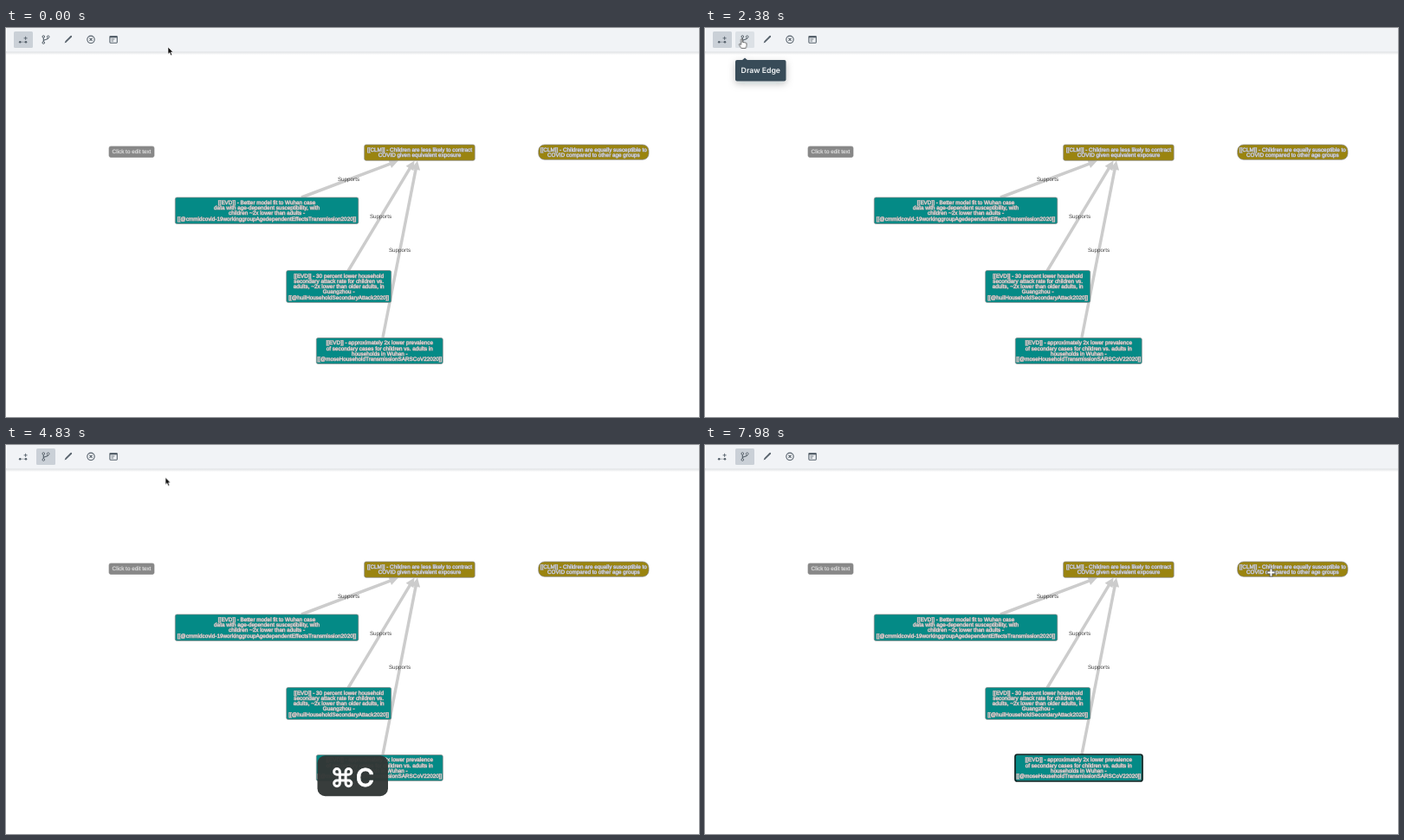
An HTML page that plays this animation: 800x450 px, repeating every 8000 ms.

```html
<!DOCTYPE html>
<html lang="en">
<head>
<meta charset="utf-8">
<title>Discourse graph: draw edge</title>
<style>
html, body { margin: 0; width: 100%; height: 100%; overflow: hidden; background: #fff; }
svg { display: block; width: 800px; height: 450px; text-rendering: geometricPrecision; }

.node text { font: 6.35px "Liberation Sans", Arial, sans-serif; fill: #ececec; stroke: #999; stroke-width: .9px; paint-order: stroke; text-anchor: middle; }
.node rect { stroke: #888; stroke-width: .7; }
.edge { stroke: #ccc; stroke-width: 3.5; }
.label { font: 6.3px "Liberation Sans", Arial, sans-serif; fill: #444; text-anchor: middle; }
.icons { fill: none; stroke: #56616b; stroke-width: 1.1; }
.icons .solid { fill: #56616b; stroke: none; }
.keys text { font: 600 7.5px Inter, sans-serif; fill: #4a545e; text-anchor: middle; }
.tip text { font: 600 8.7px Inter, sans-serif; fill: #f5f8fa; text-anchor: middle; }
.cmd { fill: none; stroke: #fff; stroke-width: 2.7; }
.big { font: 600 29px Inter, sans-serif; fill: #fff; stroke: #fff; stroke-width: .5px; text-anchor: middle; }
.plate { fill: #323736; fill-opacity: .97; }

/* one shared 8 s timeline; 1% is 80 ms */
.run { animation: 8s step-end infinite; }
.smooth { animation-timing-function: linear; }
#cursor { animation-name: travel; animation-timing-function: ease-in-out; }
#arrow { animation-name: arrow; }
#hand { animation-name: hand; }
#cell { animation-name: cell; }
#nodeMode { animation-name: nodeMode; }
#hover { animation-name: hover; }
#edgeMode { animation-name: edgeMode; }
#tip { animation-name: tip; }
#keys { animation-name: keys; }
#cmd { animation-name: cmd; }
#cmdC { animation-name: cmdC; }
#halo { animation-name: halo; }
#picked { animation-name: picked; }
#ring { animation-name: ring; transform-origin: 500px 370px; }

@keyframes travel {
  0% { transform: translate(187px, 22px); }
  13.125% { transform: translate(66px, 39px); }
  20%, 50% { transform: translate(42.5px, 13px); }
  60.375% { transform: translate(184px, 37.5px); }
  64% { transform: translate(188px, 42px); }
  81%, 90.4% { transform: translate(500px, 369.5px); }
  99.4%, 100% { transform: translate(653.5px, 147.5px); }
}
@keyframes arrow {
  0% { opacity: 1; } 17.2% { opacity: 0; } 53% { opacity: 1; }
  79% { opacity: 0; } 92% { opacity: 1; } 97.6%, 100% { opacity: 0; }
}
@keyframes hand { 0% { opacity: 0; } 17.2% { opacity: 1; } 53%, 100% { opacity: 0; } }
@keyframes cell {
  0% { opacity: 0; } 79% { opacity: 1; } 92% { opacity: 0; } 97.6%, 100% { opacity: 1; }
}
@keyframes nodeMode { 0% { opacity: 1; } 49%, 100% { opacity: 0; } }
@keyframes hover { 0% { opacity: 0; } 17.2% { opacity: 1; } 49%, 100% { opacity: 0; } }
@keyframes edgeMode { 0% { opacity: 0; } 49%, 100% { opacity: 1; } }
@keyframes tip { 0%, 18.3% { opacity: 0; } 19.6%, 53% { opacity: 1; } 54.2%, 100% { opacity: 0; } }
@keyframes keys { 0% { opacity: 0; } 32.4% { opacity: 1; } 58.6%, 100% { opacity: 0; } }
@keyframes cmd { 0% { opacity: 0; } 32.4% { opacity: 1; } 49%, 100% { opacity: 0; } }
@keyframes cmdC { 0%, 48.9% { opacity: 0; } 49%, 63.5% { opacity: 1; } 66%, 100% { opacity: 0; } }
@keyframes halo { 0% { opacity: 0; } 85.6% { opacity: 1; } 89.8%, 100% { opacity: 0; } }
@keyframes picked { 0% { opacity: 0; } 89.8%, 100% { opacity: 1; } }
@keyframes ring {
  0%, 85.5% { opacity: 0; transform: scale(.6); }
  86.5%, 89.8% { opacity: 1; transform: none; }
  91%, 100% { opacity: 0; transform: none; }
}
</style>
</head>
<body>
<svg viewBox="0 0 800 450">
  <defs>
    <filter id="soft" x="-30%" y="-80%" width="160%" height="300%">
      <feDropShadow dx="0" dy="3" stdDeviation="4" flood-color="#10161a" flood-opacity=".25"/>
    </filter>
    <linearGradient id="fade" x2="0" y2="1">
      <stop stop-color="#d9dcdf"/><stop offset="1" stop-color="#fff"/>
    </linearGradient>
    <path id="loop" d="M18 3a3 3 0 0 0-3 3v12a3 3 0 1 0 3-3H6a3 3 0 1 0 3 3V6a3 3 0 1 0-3 3h12a3 3 0 0 0 0-6z"/>
  </defs>

  <rect y="27" width="800" height="4" fill="url(#fade)"/>
  <rect x="1" width="799" height="27.5" fill="#f1f3f6"/>

  <rect id="nodeMode" class="run" x="9" y="4" width="22" height="19" rx="1.5" fill="#cad0d7"/>
  <rect id="hover" class="run" x="35" y="4" width="22" height="19" rx="1.5" fill="#dce1e6"/>
  <rect id="edgeMode" class="run" x="35" y="4" width="22" height="19" rx="1.5" fill="#cad0d7"/>

  <g class="icons">
    <path d="M17 16.2h5" stroke-dasharray="1.2 .8" stroke-width=".7"/>
    <path d="M20.6 11.8h4M22.6 9.8v4" stroke-width=".9"/>
    <g class="solid">
      <circle cx="16.2" cy="16.2" r="1.3"/><circle cx="23" cy="16.2" r="1.3"/>
    </g>
    <path d="M43.3 11v5M43.3 15c0-2 5.4-.8 5.4-4"/>
    <g fill="#f1f3f6" stroke-width="1">
      <circle cx="43.3" cy="10" r="1.3"/><circle cx="48.7" cy="10.2" r="1.3"/><circle cx="43.3" cy="17" r="1.3"/>
    </g>
    <path class="solid" d="M67.6 17.6l1-2.6 5.9-5.9q.7-.6 1.3 0t0 1.3l-5.9 5.9z"/>
    <circle cx="98" cy="13.3" r="4.2"/>
    <path d="M96.4 11.7l3.2 3.2M99.6 11.7l-3.2 3.2"/>
    <rect x="119.9" y="9.6" width="8.4" height="7.6" rx=".6"/>
    <path d="M119.9 10.5h8.4" stroke-width="1.7"/>
    <path d="M121.5 13h3.8M121.5 15h2.6" stroke-width=".8"/>
  </g>
  <g id="keys" class="keys run"></g>

  <g id="graph"></g>

  <rect id="picked" class="run" x="358" y="358" width="147" height="31" rx="2.5" fill="none" stroke="#07201f" stroke-width="1.7"/>
  <rect id="halo" class="run" x="354" y="354" width="154.5" height="39" rx="2" fill="#000" fill-opacity=".25"/>

  <g id="tip" class="tip run smooth">
    <g filter="url(#soft)" fill="#394b59">
      <path d="M42 38l4-3.6 4 3.6z"/>
      <rect x="35" y="37" width="58.5" height="24.5" rx="2"/>
    </g>
    <text x="64.3" y="52.2">Draw Edge</text>
  </g>

  <g id="cmd" class="run">
    <rect class="plate" x="370" y="359.2" width="61" height="47" rx="9"/>
    <use href="#loop" class="cmd" transform="translate(386.6 370.8) scale(1.12)"/>
  </g>
  <g id="cmdC" class="run smooth">
    <rect class="plate" x="359.5" y="359.2" width="81.5" height="47" rx="9"/>
    <use href="#loop" class="cmd" transform="translate(375.3 371.2) scale(1.12)"/>
    <text class="big" x="414.4" y="395">C</text>
  </g>

  <circle id="ring" class="run smooth" cx="500" cy="370" r="15" fill="none" stroke="#5b86d6" stroke-width="1.2"/>
  <g id="cursor" class="run">
    <path id="arrow" class="run" d="M0 0v8.3l1.9-1.7 1.4 3.2 1.5-.7-1.4-3.1h2.5z" fill="#111" stroke="#fff" stroke-width=".6"/>
    <path id="hand" class="run" d="M-.9 0q.9-1.2 1.8 0v3.6q1-.7 1.6.2 1-.6 1.6.4 1.2-.4 1.4.8v2.6l-1 2.8H-.6L-3 6.6q-.3-1.4 1-1.1l1.1 1z" fill="#fff" stroke="#333" stroke-width=".7"/>
    <g id="cell" class="run" fill="none">
      <path d="M-4.8 0h9.6M0-4.8v9.6" stroke="#333" stroke-width="3.6"/>
      <path d="M-4.2 0h8.4M0-4.2v8.4" stroke="#fff" stroke-width="2.2"/>
    </g>
  </g>
</svg>

<script>
const NS = "http://www.w3.org/2000/svg";
const graph = document.getElementById("graph");
const TEAL = "#048a86", OLIVE = "#9a840f";

function add(parent, tag, attrs, text) {
  const el = document.createElementNS(NS, tag);
  for (const key in attrs) el.setAttribute(key, attrs[key]);
  if (text) el.textContent = text;
  parent.append(el);
  return el;
}

function edge(x1, y1, x2, y2, lx, ly) {
  const len = Math.hypot(x2 - x1, y2 - y1);
  const turn = Math.atan2(y2 - y1, x2 - x1) * 180 / Math.PI;
  const g = add(graph, "g", { transform: `translate(${x1} ${y1}) rotate(${turn})` });
  add(g, "path", { class: "edge", d: `M0 0H${len - 8}` });
  add(g, "path", { fill: "#ccc", d: `M${len} 0l-10.5-5.2v10.4z` });
  add(graph, "text", { class: "label", x: lx, y: ly + 2.2 }, "Supports");
}

function node(x, y, w, h, rx, fill, lines) {
  const g = add(graph, "g", { class: "node" });
  add(g, "rect", { x, y, width: w, height: h, rx, fill });
  const pitch = 6.2, top = y + h / 2 - (lines.length - 1) * pitch / 2 + 2.1;
  lines.forEach((line, i) => add(g, "text", { x: x + w / 2, y: top + i * pitch }, line));
}

edge(341, 196, 453, 153.5, 395.5, 175);
edge(395, 281, 471.5, 153.5, 432.5, 218);
edge(435, 358, 475, 153.5, 454.5, 257);

node(119, 137, 52, 12.5, 2, "#888", ["Click to edit text"]);
node(413.7, 135, 127.5, 18.3, 2, OLIVE, [
  "[[CLM]] - Children are less likely to contract",
  "COVID given equivalent exposure"]);
node(614.7, 135, 127.3, 17.3, 7, OLIVE, [
  "[[CLM]] - Children are equally susceptible to",
  "COVID compared to other age groups"]);
node(195.3, 196, 211.5, 30.5, 2, TEAL, [
  "[[EVD]] - Better model fit to Wuhan case",
  "data with age-dependent susceptibility, with",
  "children ~2x lower than adults -",
  "[[@cmmidcovid-19workinggroupAgedependentEffectsTransmission2020]]"]);
node(323.7, 280.5, 121, 37, 2, TEAL, [
  "[[EVD]] - 30 percent lower household",
  "secondary attack rate for children vs.",
  "adults, ~2x lower than older adults, in",
  "Guangzhou -",
  "[[@huilHouseholdSecondaryAttack2020]]"]);
node(358.3, 358.5, 146, 30, 2, TEAL, [
  "[[EVD]] - approximately 2x lower prevalence",
  "of secondary cases for children vs. adults in",
  "households in Wuhan -",
  "[[@moseHouseholdTransmissionSARSCoV22020]]"]);

const keys = document.getElementById("keys");
[..."nceda"].forEach((key, i) => add(keys, "text", { x: 25 + i * 26, y: 21.8 }, key));
</script>
</body>
</html>
```
